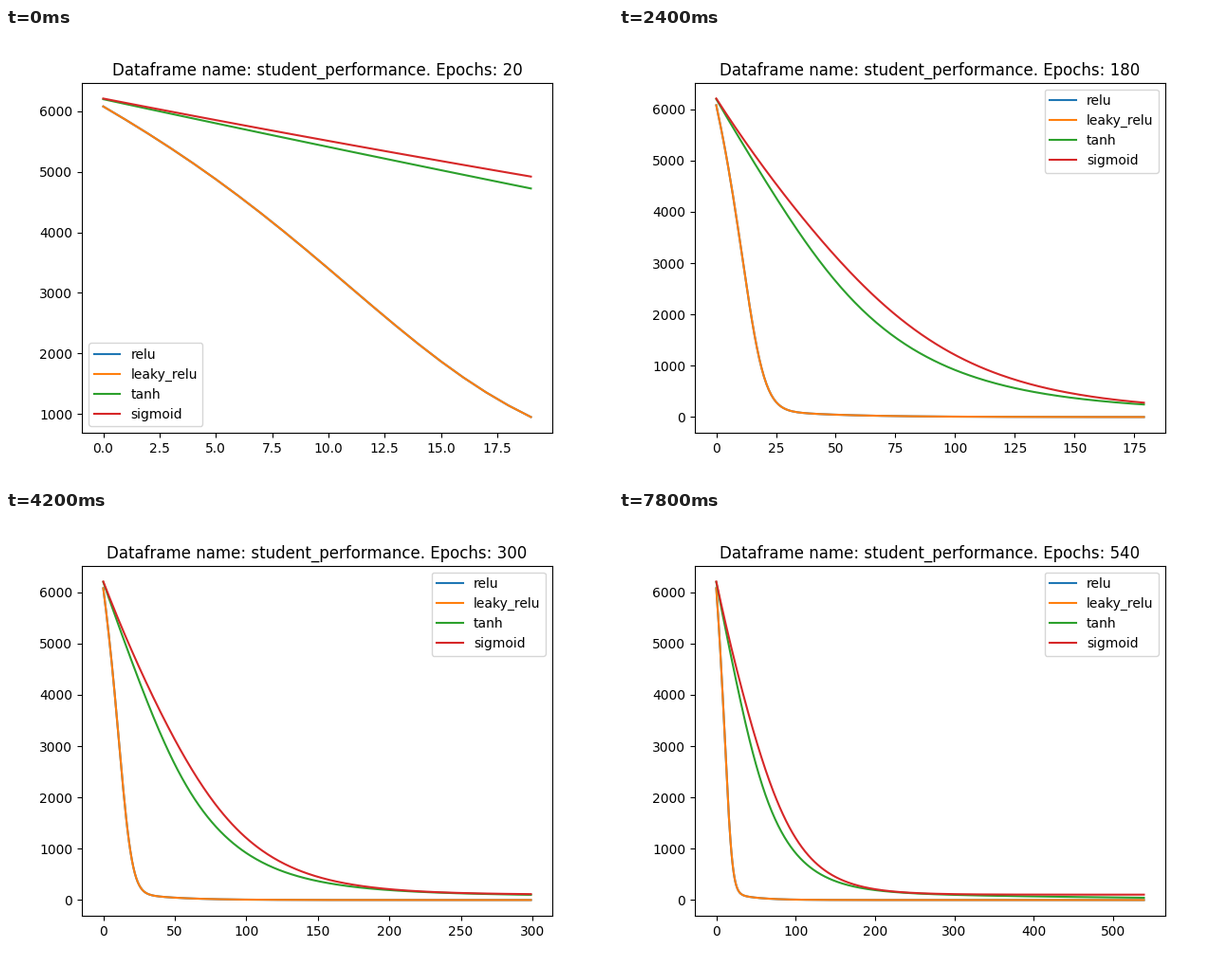
A matplotlib script for the animation above (8 s loop, 640x480 px).

```python
import numpy as np
import matplotlib.pyplot as plt
from matplotlib.animation import FuncAnimation

INTERVAL = 100          # ms per tick
TICKS = 80              # one loop of 8 s
TICKS_PER_STEP = 3      # the plot grows every 300 ms
EPOCHS_PER_STEP = 20
MAX_EPOCHS = 540

epochs = np.arange(MAX_EPOCHS)


def training_loss(start, rate, boost, center, steepness, tail, tail_rate):
    """Decay whose rate climbs from rate to rate + boost, plus a slow tail."""
    def integral(t):
        return np.logaddexp(0, steepness * (t - center)) / steepness

    exponent = rate * epochs + boost * (integral(epochs) - integral(0))
    return ((start - tail) * np.exp(-exponent)
            + tail * np.exp(-tail_rate * epochs))


relu_loss = training_loss(6078, 0.021, 0.2975, 15.8, 0.187, 264, 0.035)
losses = {
    "relu": relu_loss,
    "leaky_relu": relu_loss,
    "tanh": training_loss(6198, 0.0113, 0.0133, 25.5, 0.066, 244, 0.00313),
    "sigmoid": training_loss(6209, 0.0106, 0.0131, 50.5, 0.044, 105, 0),
}

fig, ax = plt.subplots(figsize=(6.4, 4.8), dpi=100)


def draw(tick):
    count = EPOCHS_PER_STEP * (1 + tick // TICKS_PER_STEP)
    ax.clear()
    for name, loss in losses.items():
        ax.plot(epochs[:count], loss[:count], label=name)
    ax.set_title(f"Dataframe name: student_performance. Epochs: {count}")
    ax.legend()


animation = FuncAnimation(fig, draw, frames=TICKS, interval=INTERVAL,
                          repeat=True, cache_frame_data=False)
plt.show()
```
